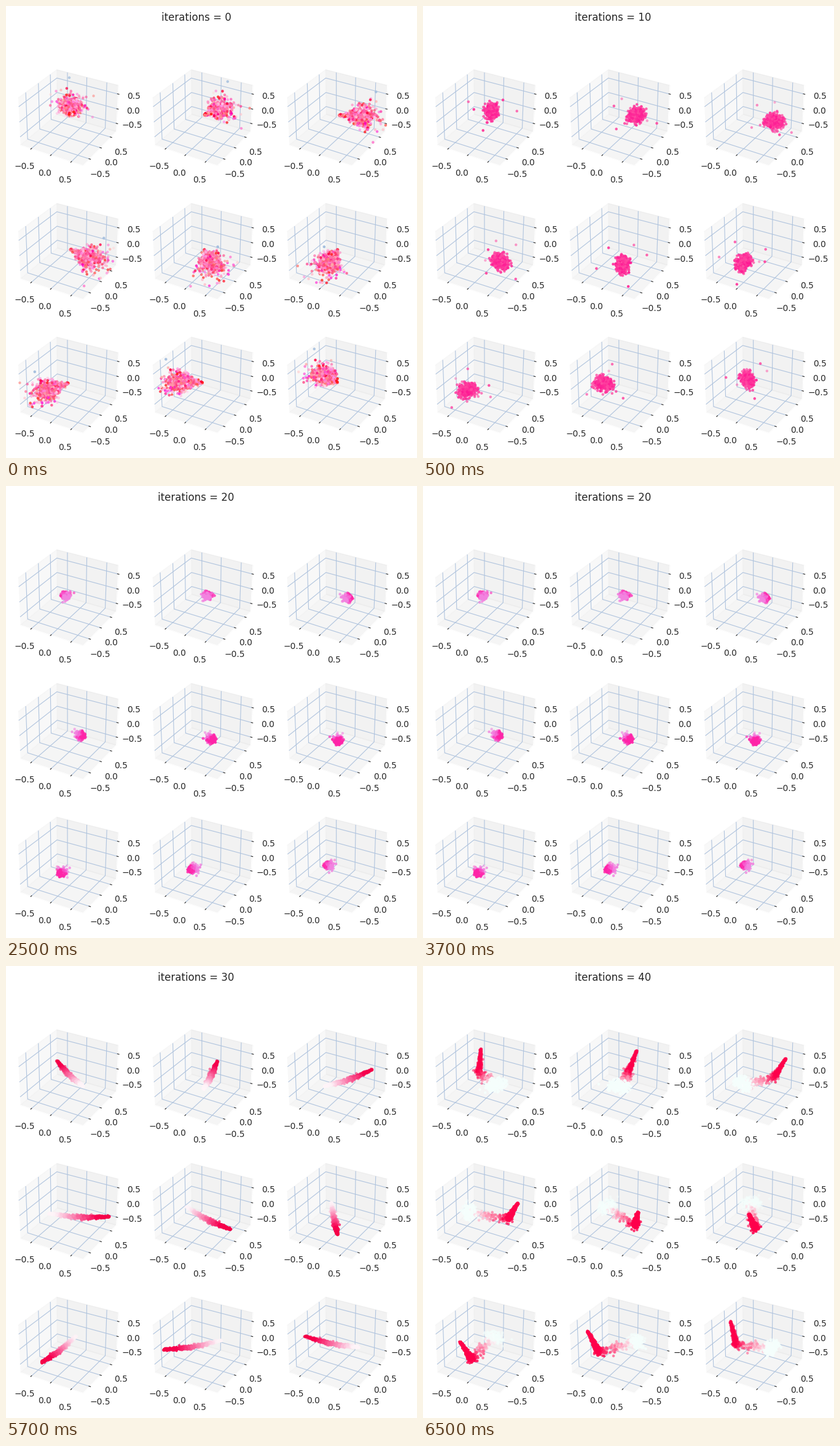
Animation, 669 px wide and 735 px high, one loop 8000 ms. Source, as a matplotlib script:

```python
import numpy as np
import matplotlib.pyplot as plt
from matplotlib.animation import FuncAnimation
from matplotlib.colors import hsv_to_rgb

WIDTH, HEIGHT, DPI = 669, 735, 100
CROP_X, CROP_Y = 90.59, 58.68    # the stage is a window on an 800 px square figure
PANEL_W, PANEL_H = 620 / 3.4, 616 / 3.4
GAP = 1.2
LIMIT = 0.75 * 25 / 24
INTERVAL = 500

plt.rcParams.update({
    "font.family": "DejaVu Sans", "font.size": 10,
    "text.color": ".15", "xtick.color": ".15", "ytick.color": ".15",
    "axes.edgecolor": "white", "grid.color": "lightsteelblue",
})
rng = np.random.default_rng(4)


def turn(radial, tangent, z, degrees):
    """Points given along and across a direction, turned about the z axis."""
    a = np.radians(degrees)
    x = radial * np.cos(a) - tangent * np.sin(a)
    y = radial * np.sin(a) + tangent * np.cos(a)
    return np.column_stack(np.broadcast_arrays(x, y, z))


def polar(r, degrees, z):
    return turn(np.atleast_1d(r), 0, z, degrees)


def blob(n, center, spread):
    r, degrees, z = center
    d = rng.normal(size=(n, 3)) * spread
    return turn(r + d[:, 0], d[:, 1], z + d[:, 2], degrees)


def shell(n, center, radius):
    d = rng.normal(size=(n, 3))
    return polar(*center) + radius * d / np.linalg.norm(d, axis=1, keepdims=True)


def strand(start, end, t, spread):
    a, b = polar(*start), polar(*end)
    noise = rng.normal(size=(len(t), 3)) * np.reshape(spread, (-1, 1))
    return a + (b - a) * t[:, None] + noise


def hsv(hue, saturation, value=1):
    channels = np.broadcast_arrays(np.mod(hue, 1), np.clip(saturation, 0, 1), value)
    return hsv_to_rgb(np.column_stack(channels))


def scattered():
    n = 750
    d = np.clip(rng.standard_t(5, size=(n, 3)), -3.6, 3.6)
    r = np.maximum(0.45 + 0.14 * d[:, 0], 0.03)
    grow = r / 0.45
    points = turn(r, 0.09 * grow * d[:, 1],
                  -0.15 * r + 0.085 * grow * d[:, 2], 117)
    # Colours vary more away from the core.
    outer = np.linalg.norm(d, axis=1) / 2
    tint = rng.normal(size=n) * outer
    colors = hsv(0.937 + 0.035 * np.clip(tint, -2, 2),
                 0.57 + 0.15 * outer * rng.normal(size=n))
    blue = polar(0.83, 120, 0.67)
    return np.vstack([points, blue]), np.vstack([colors, hsv(0.59, 0.26, 0.87)])


def gathered():
    center = (0.42, 105, -0.175)
    points = np.vstack([blob(480, center, (0.1, 0.062, 0.095)),
                        shell(6, center, 0.58)])
    mix = rng.random(len(points))
    return points, hsv(0.91 + 0.01 * mix, 0.92 - 0.24 * mix)


def compact():
    center = (0.236, 140, -0.175)
    points = np.vstack([blob(300, center, (0.042, 0.042, 0.048)),
                        shell(4, center, 0.2)])
    r = np.hypot(points[:, 0], points[:, 1]) + rng.normal(0, 0.015, len(points))
    depth = np.clip((r - 0.2) / 0.09, 0, 1)
    return points, hsv(0.86 + 0.04 * depth, 0.46 + 0.4 * depth, 0.95 + 0.05 * depth)


def stretched():
    t = rng.random(600)
    bulge = np.sin(np.pi * t)
    points = strand((0.45, -20, -0.09), (0.88, 139, -0.122), t,
                    0.01 + 0.016 * bulge)
    points[:, 2] -= 0.06 * bulge
    return points, hsv(0.925 + 0.027 * t, np.maximum((t - 0.07) / 0.72, 0.04),
                       1 - 0.04 * t)


def split():
    base, tip, far = (0.486, 140, -0.254), (0.71, 130, 0.37), (0.37, -25, -0.07)
    s = rng.random(380) ** 1.3
    t = rng.random(120) ** 1.3
    spike = strand(base, tip, s, 0.007 + 0.026 * (1 - s))
    bridge = strand(base, far, t, 0.06)
    cloud = blob(260, far, (0.06, 0.11, 0.085))
    colors = [hsv(0.951, np.ones_like(s)),
              hsv(0.951, (1 - t) ** 1.3),
              hsv(0.46, np.full(len(cloud), 0.04))]
    return np.vstack([spike, bridge, cloud]), np.vstack(colors)


def add_panel(row, col):
    left = 100 - CROP_X + GAP * PANEL_W * col
    bottom = 88 - CROP_Y + GAP * PANEL_H * (2 - row)
    ax = fig.add_axes([left / WIDTH, bottom / HEIGHT,
                       PANEL_W / WIDTH, PANEL_H / HEIGHT], projection="3d")
    return ax


fig = plt.figure(figsize=(WIDTH / DPI, HEIGHT / DPI), dpi=DPI, facecolor="white")
title = fig.suptitle("", x=(400 - CROP_X) / WIDTH, y=(784 - CROP_Y) / HEIGHT,
                     fontsize=12)
stages = [make() for make in (scattered, gathered, compact, stretched, split)]
clouds = [[] for _ in stages]

for panel in range(9):
    ax = add_panel(*divmod(panel, 3))
    for (points, colors), group in zip(stages, clouds):
        x, y, z = turn(*points.T, -40 * panel).T
        group.append(ax.scatter(x, y, z, c=colors, s=20, marker="."))
    ax.set(xlim=(-LIMIT, LIMIT), ylim=(-LIMIT, LIMIT), zlim=(-LIMIT, LIMIT))
    for axis in (ax.xaxis, ax.yaxis, ax.zaxis):
        axis.set_ticks([-0.5, 0, 0.5])


def update(tick):
    stage = (tick + 3) // 4      # the first stage shows for a single tick
    title.set_text(f"iterations = {10 * stage}")
    for i, group in enumerate(clouds):
        for cloud in group:
            cloud.set_visible(i == stage)
    return []


anim = FuncAnimation(fig, update, frames=16, interval=INTERVAL,
                     repeat=True, repeat_delay=0)
plt.show()
```
